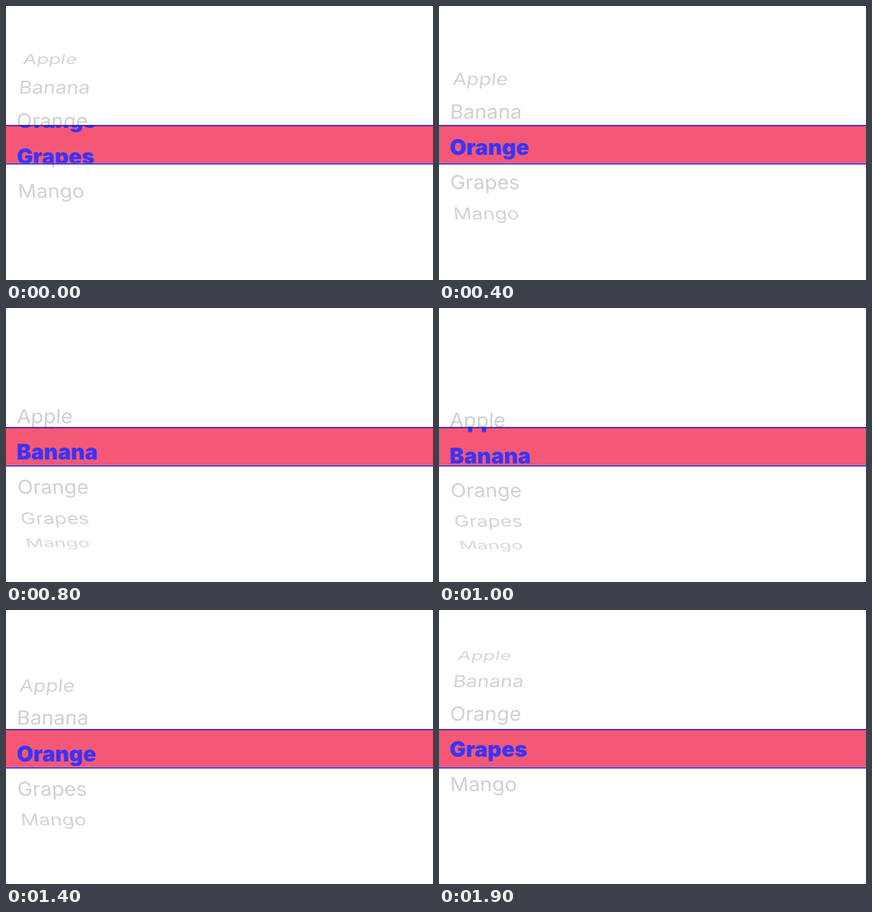
Write an HTML page with a canvas that moves like this. It is 646 px wide and 416 px high and loops after 2 s.

```html
<!DOCTYPE html>
<html lang="en">
<head>
<meta charset="utf-8">
<title>Fruit picker</title>
<style>
  html, body { margin: 0; width: 100%; height: 100%; overflow: hidden; background: #fff; }
  canvas { display: block; }
</style>
</head>
<body>
<canvas id="stage" width="646" height="416"></canvas>
<script>
const ctx = document.getElementById('stage').getContext('2d');
const W = 646, H = 416, LOOP = 2000, STEP = 100;
const LABELS = ['Apple', 'Banana', 'Orange', 'Grapes', 'Mango'];

// Drum geometry: rows sit on a cylinder seen in perspective.
const CX = W / 2, CY = 210.5, RADIUS = 210, ROW_ANGLE = 0.26, DISTANCE = 1340;
const TEXT_X = 15.2, TEXT_MID = 75;
const BAND = { top: 181, bottom: 240 };

const PLAIN = { font: '400 31px Inter, sans-serif', color: '#cfcfcf', inset: 0, baseline: 11.3 };
const PICKED = { font: '900 32.7px Inter, sans-serif', color: '#3a34f6', inset: 0.9, baseline: 12 };

// Row index at the centre of the drum, one value per step of the drag.
const SCROLL = [
  2.68, 2.68, 2.45, 2.2, 1.94, 1.59, 1.25, 1, 0.86, 0.78,
  0.75, 0.95, 1.26, 1.57, 1.87, 2.24, 2.58, 2.825, 2.94, 3
];

function placeOnDrum(angle) {
  const sin = Math.sin(angle), cos = Math.cos(angle);
  const scale = DISTANCE / (DISTANCE + RADIUS * (1 - cos));
  const slope = -scale * scale * sin / DISTANCE;
  ctx.setTransform(
    scale, 0,
    (TEXT_MID - CX) * slope, cos * scale + RADIUS * sin * slope,
    CX + (TEXT_X - CX) * scale, CY + RADIUS * sin * scale
  );
  ctx.globalAlpha = 0.4 + 0.6 * cos;
}

function drawRows(scroll, style, top, bottom) {
  ctx.save();
  ctx.beginPath();
  ctx.rect(0, top, W, bottom - top);
  ctx.clip();
  ctx.font = style.font;
  ctx.fillStyle = style.color;
  LABELS.forEach((label, row) => {
    placeOnDrum((row - scroll) * ROW_ANGLE);
    ctx.fillText(label, style.inset, style.baseline);
  });
  ctx.restore();
}

function fillBar(color, y, height) {
  ctx.fillStyle = color;
  ctx.fillRect(0, y, W, height);
}

function draw(time) {
  const scroll = SCROLL[Math.floor(time % LOOP / STEP)];
  fillBar('#fff', 0, H);
  drawRows(scroll, PLAIN, 0, BAND.top);
  drawRows(scroll, PLAIN, BAND.bottom, H);
  fillBar('#f55876', BAND.top, BAND.bottom - BAND.top);
  drawRows(scroll, PICKED, BAND.top + 1, BAND.bottom - 1);
  fillBar('rgba(255, 225, 240, 0.4)', BAND.bottom - 2, 1);
  fillBar('#1808a4', BAND.top - 0.3, 1.6);
  fillBar('#1a10c8', BAND.bottom - 1.1, 1.6);
}

const start = performance.now();
function tick() {
  draw(performance.now() - start);
  requestAnimationFrame(tick);
}
tick();
</script>
</body>
</html>
```
